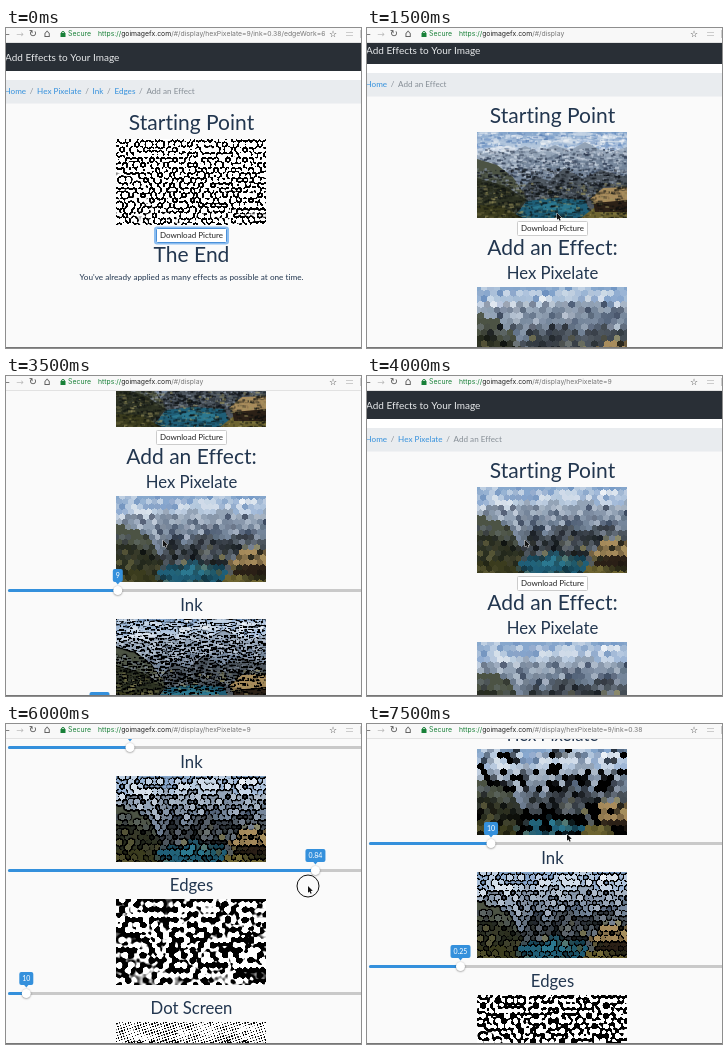
Recreate the animation shown at these times as an HTML page with a canvas. Size 355x320 px, loop 8 s.

```html
<!DOCTYPE html>
<html lang="en">
<head>
<meta charset="utf-8">
<title>Image effects</title>
<style>
html, body { margin: 0; width: 355px; height: 320px; overflow: hidden; background: #fafafa; }
canvas { display: block; }
</style>
</head>
<body>
<canvas id="stage" width="355" height="320"></canvas>
<script>
const ctx = document.getElementById('stage').getContext('2d');
const W = 150, H = 86, LEFT = 110, STEP = 500;
const BLUE = '#3490dc', NAVY = '#22364f';
const SANS = 'Lato, sans-serif', UI = 'Inter, sans-serif', SYMBOL = '"DejaVu Sans", sans-serif';
ctx.letterSpacing = '0.01px'; // turns ligatures off

// ---------- picture effects ----------
const clamp = (v, max) => Math.max(0, Math.min(max, v));

function perPixel(color) {
  const out = new ImageData(W, H);
  for (let i = 0; i < W * H; i++) out.data.set([...color(i % W, Math.floor(i / W), i), 255], i * 4);
  return out;
}

const rgb = (img, i) => img.data.subarray(i * 4, i * 4 + 3);

function brightness(img) {
  return Float32Array.from({ length: W * H }, (_, i) => {
    const [r, g, b] = rgb(img, i);
    return (r + g + b) / 3;
  });
}

function blur(values, sigma) {
  const reach = Math.ceil(sigma * 3);
  const pass = (src, dx, dy) => src.map((_, i) => {
    const x = i % W, y = Math.floor(i / W);
    let sum = 0, total = 0;
    for (let k = -reach; k <= reach; k++) {
      const w = Math.exp(-k * k / (2 * sigma * sigma));
      sum += w * src[clamp(y + k * dy, H - 1) * W + clamp(x + k * dx, W - 1)];
      total += w;
    }
    return sum / total;
  });
  return pass(pass(values, 1, 0), 0, 1);
}

function contrast(img, small, big) {
  const light = brightness(img), wide = blur(light, big);
  return blur(light, small).map((v, i) => v - wide[i]);
}

function hexPixelate(img, size) {
  const pitch = size * 0.65, rowHeight = pitch * 0.866;
  return perPixel((x, y) => {
    let best = Infinity, index = 0;
    const row = Math.floor(y / rowHeight);
    for (const r of [row, row + 1]) {
      const shift = (r % 2) * pitch / 2;
      const cx = Math.round((x - shift) / pitch) * pitch + shift, cy = r * rowHeight;
      const dist = (x - cx) ** 2 + (y - cy) ** 2;
      if (dist < best) {
        best = dist;
        index = clamp(Math.round(cy), H - 1) * W + clamp(Math.round(cx), W - 1);
      }
    }
    return rgb(img, index);
  });
}

function ink(img, strength) {
  const diff = contrast(img, 0.4, 0.9);
  return perPixel((x, y, i) => {
    const keep = 1 - clamp(-diff[i] * strength * 0.6, 1);
    return Array.from(rgb(img, i), c => c * keep);
  });
}

function edges(img, radius) {
  const diff = contrast(img, radius * 0.11, radius * 0.22);
  return perPixel((x, y, i) => Array(3).fill(128 + diff[i] * 90));
}

function dotScreen(img) {
  const light = brightness(img), c = Math.cos(1.1) * 1.6, s = Math.sin(1.1) * 1.6;
  return perPixel((x, y, i) => {
    const dots = Math.sin(c * x - s * y) * Math.sin(s * x + c * y) * 4;
    return Array(3).fill(255 * (light[i] / 255 * 10 - 5 + dots));
  });
}

function paintPhoto() {
  const p = Object.assign(document.createElement('canvas'), { width: W, height: H }).getContext('2d');
  let seed = 7;
  const rand = () => (seed = (seed * 16807) % 2147483647) / 2147483647;
  const shape = (color, ...pts) => {
    p.fillStyle = color;
    p.beginPath();
    for (let i = 0; i < pts.length; i += 2) p.lineTo(pts[i], pts[i + 1]);
    p.fill();
  };
  // dark and light strokes scattered over a band of the picture
  const grain = (count, top, bottom, dark, light, share, alpha) => {
    for (let i = 0; i < count; i++) {
      p.fillStyle = `rgba(${rand() < share ? dark : light},${rand() * alpha})`;
      p.fillRect(rand() * W - 2, top + rand() * (bottom - top), 1 + rand() * 4, 1 + rand() * 1.5);
    }
  };
  const sky = p.createLinearGradient(0, 0, 0, 24);
  sky.addColorStop(0, '#84a5cc');
  sky.addColorStop(1, '#d6dfe8');
  p.fillStyle = sky;
  p.fillRect(0, 0, W, H);
  for (let i = 0; i < 34; i++) {
    p.fillStyle = i % 3 ? 'rgba(236,240,244,.55)' : 'rgba(92,134,190,.45)';
    p.beginPath();
    p.ellipse(rand() * W, 1 + rand() * 16, 4 + rand() * 11, 1 + rand() * 2, 0, 0, 7);
    p.fill();
  }
  grain(500, 0, 22, '84,122,176', '246,248,250', 0.4, 0.6);
  shape('#93a3b6', 0, 23, 18, 19, 32, 22, 48, 14, 62, 20, 78, 13, 92, 19, 108, 10, 122, 17, 135, 20, 150, 15, 150, 86, 0, 86);
  shape('#75869b', 30, 42, 50, 24, 64, 30, 82, 20, 96, 29, 112, 18, 130, 29, 150, 23, 150, 86, 30, 86);
  grain(900, 16, 44, '38,50,72', '206,216,228', 0.5, 0.75);
  shape('#4d565f', 40, 62, 58, 44, 72, 49, 88, 36, 106, 47, 124, 38, 150, 45, 150, 86, 40, 86);
  shape('#4c5344', 0, 27, 20, 33, 36, 45, 50, 66, 30, 86, 0, 86);
  grain(900, 36, 66, '14,18,24', '140,152,168', 0.6, 0.75);
  shape('rgba(36,40,24,.75)', 0, 46, 28, 54, 50, 68, 36, 86, 0, 86);
  shape('#1f5f78', 36, 86, 50, 69, 76, 66, 108, 68, 116, 86);
  shape('#2b7890', 52, 76, 78, 70, 102, 74, 96, 81);
  shape('#3b3c1e', 0, 73, 24, 74, 46, 86, 0, 86);
  shape('#6d6430', 104, 86, 118, 75, 150, 72, 150, 86);
  shape('#2c2117', 116, 69, 150, 67, 150, 80, 118, 80);
  shape('#a88c5c', 113, 67, 126, 56, 150, 55, 150, 68, 118, 71);
  grain(800, 50, 86, '10,14,14', '160,152,96', 0.75, 0.65);
  return p.getImageData(0, 0, W, H);
}

const cache = {};
const once = (key, make) => cache[key] ??= make();

// ---------- pages ----------
const photo = paintPhoto();
const hexed = hexPixelate(photo, 9);
const inked = ink(hexed, 0.38);

const pages = {
  home: { path: '', crumbs: [] },
  loading: { path: 'display', crumbs: [], img: photo },
  plain: { path: 'display', crumbs: [], img: photo, effects: true },
  hex: { path: 'display/hexPixelate=9', crumbs: ['Hex Pixelate'], img: hexed, effects: true },
  ink: { path: 'display/hexPixelate=9/ink=0.38', crumbs: ['Hex Pixelate', 'Ink'], img: inked, effects: true },
  end: {
    path: 'display/hexPixelate=9/ink=0.38/edgeWork=6', crumbs: ['Hex Pixelate', 'Ink', 'Edges'],
    img: edges(inked, 6), end: true
  }
};

const effects = [
  { name: 'Hex Pixelate', apply: hexPixelate, scale: 12.2 },
  { name: 'Ink', apply: ink, scale: 366 },
  { name: 'Edges', apply: edges, scale: 1.83 },
  { name: 'Dot Screen', apply: dotScreen, scale: 12 }
];

// page, scroll, hex size, ink strength, pointer x, pointer y, pressed
const steps = [
  ['end', 0, 10, 0.25],
  ['home', 0, 10, 0.25],
  ['loading', 0, 10, 0.25],
  ['plain', 7, 10, 0.25, 190, 184],
  ['plain', 146, 4, 0.25, 48, 208, true],
  ['plain', 146, 6, 0.25, 93, 208, true],
  ['plain', 146, 9, 0.25, 118, 208, true],
  ['plain', 146, 9, 0.25, 157, 163],
  ['hex', 0, 10, 0.25, 158, 163],
  ['hex', 214, 10, 0.25, 158, 164],
  ['hex', 337, 10, 0.25, 158, 164],
  ['hex', 337, 10, 0.13, 50, 161, true],
  ['hex', 337, 10, 0.84, 302, 161, true],
  ['hex', 337, 10, 0.38, 141, 150, true],
  ['ink', 337, 10, 0.25, 200, 109],
  ['ink', 241, 10, 0.25, 200, 109]
];

// ---------- drawing ----------
function rect(x, y, w, h, color) {
  ctx.fillStyle = color;
  ctx.fillRect(x, y, w, h);
}

// y is the middle of the capitals; returns the right end of the text
function text(str, x, y, size, color, align = 'left', font = SANS) {
  ctx.font = `${size}px ${font}`;
  ctx.textAlign = align;
  ctx.fillStyle = color;
  ctx.fillText(str, x, y + size * 0.36);
  return x + ctx.measureText(str).width;
}

const heading = (str, y, size) => text(str, 185.5, y, size, NAVY, 'center');

function box(x, y, w, h, r, fill, stroke, line = 1) {
  ctx.beginPath();
  ctx.roundRect(x, y, w, h, r);
  ctx.fillStyle = fill;
  ctx.fill();
  if (!stroke) return;
  ctx.strokeStyle = stroke;
  ctx.lineWidth = line;
  ctx.stroke();
}

function slider(y, value, scale) {
  const x = 2 + value * scale, label = String(value), w = 6 + label.length * 4 - (label.includes('.') ? 2 : 0);
  box(2, y - 1.5, 360, 3, 1.5, '#c9c9c9');
  box(2, y - 1.5, x - 2, 3, 1.5, BLUE);
  ctx.save();
  ctx.shadowColor = 'rgba(0,0,0,.45)';
  ctx.shadowBlur = 2;
  ctx.shadowOffsetY = 0.5;
  box(x - 4.5, y - 4.5, 9, 9, 4.5, '#fff');
  ctx.restore();
  box(x - w / 2, y - 21.5, w, 13, 2, BLUE);
  ctx.beginPath();
  ctx.moveTo(x - 2.5, y - 9);
  ctx.lineTo(x + 2.5, y - 9);
  ctx.lineTo(x, y - 6);
  ctx.fill();
  text(label, x, y - 15, 7, '#fff', 'center');
}

function drawPage(page, scroll, values) {
  rect(0, 0, 355, 320, '#fafafa');
  rect(0, 15 - scroll, 355, 28, '#292f36');
  text('Add Effects to Your Image', -1, 29 - scroll, 10, '#e8eaec');
  if (!page.img) return;

  rect(0, 43 - scroll, 355, 9, '#fff');
  rect(0, 52 - scroll, 355, 23.5, '#e9ecef');
  let x = -1.5;
  for (const crumb of ['Home', ...page.crumbs]) {
    x = text(crumb, x, 63.5 - scroll, 8.1, BLUE);
    text('/', x + 5.5, 63.5 - scroll, 8.1, '#868e96', 'center');
    x += 11;
  }
  text('Add an Effect', x, 63.5 - scroll, 8.1, '#868e96');

  heading('Starting Point', 94.5 - scroll, 21);
  ctx.putImageData(page.img, LEFT, 111 - scroll);
  if (page.end) box(149, 199.5, 73, 16, 2, '#fff', '#8bbdf0', 2);
  box(150.5, 200.5 - scroll, 70, 14, 1, '#fff', page.end ? '#4a90d9' : '#ccc');
  text('Download Picture', 185.5, 207.5 - scroll, 8, '#222', 'center');

  heading(page.end ? 'The End' : 'Add an Effect:', 226.5 - scroll, 21);
  if (page.end) text("You've already applied as many effects as possible at one time.", 185.5, 249, 8.2, NAVY, 'center');
  if (page.path === 'display' && !page.effects) heading('Hex Pixelate', 252 - scroll, 16.7);
  if (!page.effects) return;

  effects.forEach(({ name, apply, scale }, i) => {
    const y = 123 * i - scroll, value = values[i];
    if (y < -380 || y > 90) return;
    heading(name, 252 + y, 16.7);
    const preview = once([page.path, name, value].join(), () => apply(page.img, value));
    ctx.putImageData(preview, LEFT, 266 + y);
    slider(360.5 + y, value, scale);
  });
}

function drawToolbar(path) {
  rect(0, 0, 355, 14, '#f8f8f8');
  rect(0, 14, 355, 1, '#e2e2e2');
  const icon = (glyph, x, size, color) => text(glyph, x, 5.5, size, color, 'center', SYMBOL);
  icon('←', 0, 9, '#555');
  icon('→', 14, 9, '#bbb');
  icon('↻', 27, 10, '#555');
  icon('⌂', 41, 11, '#555');
  icon('☆', 327, 9, '#444');
  rect(340, 4, 7, 1, '#ccc');
  rect(340, 7, 7, 1, '#ccc');
  rect(354, 2, 1, 8, '#ccc');
  ctx.strokeStyle = '#188038';
  ctx.lineWidth = 1;
  ctx.beginPath();
  ctx.arc(57, 5, 1.5, Math.PI, 0);
  ctx.stroke();
  rect(54.5, 5, 5, 4, '#188038');
  text('Secure', 62, 6, 6.9, '#188038', 'left', UI);
  ctx.save();
  ctx.beginPath();
  ctx.rect(90, 0, 229, 14);
  ctx.clip();
  let x = text('https://', 92, 6, 6.8, '#188038', 'left', UI);
  x = text('goimagefx.com', x, 6, 6.8, '#222', 'left', UI);
  text('/#/' + path, x, 6, 6.8, '#777', 'left', UI);
  ctx.restore();
}

function drawPointer(x, y, pressed) {
  ctx.lineWidth = 1;
  ctx.strokeStyle = '#111';
  if (pressed) {
    ctx.beginPath();
    ctx.arc(x, y + 1, 11, 0, 7);
    ctx.stroke();
  }
  ctx.save();
  ctx.translate(x, y + 1);
  ctx.scale(0.85, 0.85);
  ctx.beginPath();
  for (const [px, py] of [[0, 0], [0, 8], [1.8, 6.4], [3, 9], [4.3, 8.4], [3.2, 5.8], [5.6, 5.6]]) ctx.lineTo(px, py);
  ctx.closePath();
  ctx.strokeStyle = '#fff';
  ctx.stroke();
  ctx.fillStyle = '#111';
  ctx.fill();
  ctx.restore();
}

const start = performance.now();
let shown = -1;

function tick() {
  const now = Math.floor((performance.now() - start) / STEP) % steps.length;
  if (now !== shown) {
    shown = now;
    const [name, scroll, hexSize, strength, x, y, pressed] = steps[now];
    drawPage(pages[name], scroll, [hexSize, strength, 10, 10]);
    drawToolbar(pages[name].path);
    rect(0, 319, 355, 1, '#777');
    if (x !== undefined) drawPointer(x, y, pressed);
  }
  requestAnimationFrame(tick);
}
tick();
</script>
</body>
</html>
```
